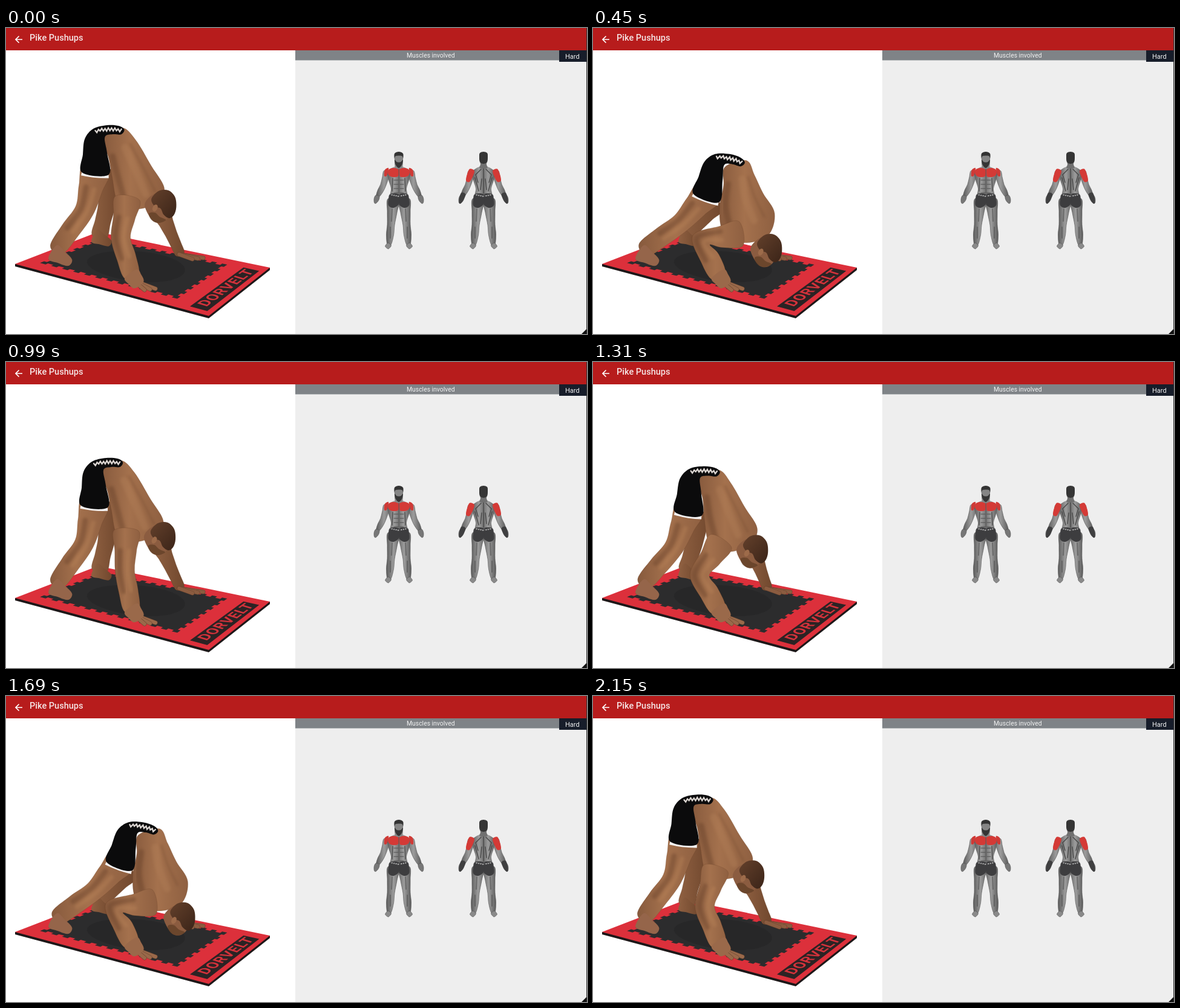
An HTML page that plays this animation: 960x507 px, repeating every 2240 ms.

```html
<!DOCTYPE html>
<html lang="en">
<head>
<meta charset="utf-8">
<title>Pike Pushups</title>
<style>
  html, body { margin: 0; width: 100%; height: 100%; overflow: hidden; background: #fff; }
  svg { display: block; width: 960px; height: 507px; }
  text { font-family: Roboto, Arial, sans-serif; }
</style>
</head>
<body>
<svg viewBox="0 0 960 507">
  <defs>
    <linearGradient id="skin">
      <stop offset="0" stop-color="#875a3d"/>
      <stop offset=".45" stop-color="#a4714d"/>
      <stop offset="1" stop-color="#8f6041"/>
    </linearGradient>
    <linearGradient id="shade">
      <stop offset="0" stop-color="#8f6041"/>
      <stop offset="1" stop-color="#71482e"/>
    </linearGradient>
    <linearGradient id="hair" x2="1" y2="1">
      <stop offset="0" stop-color="#63402b"/>
      <stop offset="1" stop-color="#3b2418"/>
    </linearGradient>
    <linearGradient id="grey">
      <stop offset="0" stop-color="#6a6a6a"/>
      <stop offset=".45" stop-color="#9c9c9c"/>
      <stop offset="1" stop-color="#5c5c5c"/>
    </linearGradient>
    <filter id="soft" x="-50%" y="-50%" width="200%" height="200%"><feGaussianBlur stdDeviation="2"/></filter>
  </defs>

  <rect x="478" y="37" width="481" height="470" fill="#eee"/>
  <rect x="478" y="37" width="437" height="16.5" fill="#7f8387"/>
  <rect width="960" height="37" fill="#b71c1c"/>
  <rect x="959" width="1" height="507" fill="#333"/>
  <rect x="914" y="37" width="45" height="19" fill="#171d2a"/>
  <path d="M959 499V507H951Z" fill="#111"/>
  <path d="M27 19H16.5M21.5 13.5L16 19L21.5 24.5" fill="none" stroke="#fff" stroke-width="1.7"/>
  <text x="39" y="21" font-size="14.5" font-weight="500" fill="#f6e6e6">Pike Pushups</text>
  <text x="662" y="49" font-size="10.4" fill="#f2f2f2">Muscles involved</text>
  <text x="924" y="51" font-size="11" fill="#f2f2f2">Hard</text>

  <g id="mat"></g>
  <text transform="matrix(.74 -.54 .957 .29 331 462)" font-size="24" font-weight="700"
        letter-spacing="1" fill="#d5323b">DORVELT</text>
  <g id="man"></g>
  <g id="muscles"></g>
</svg>
<script>
const LOOP = 2240;
// Length of each picture, in units of 10 ms
const HOLDS = [...'78787887887888789787888787889'].map(n => n * 10);
// Time and depth of the turning points; depth 0 is up, 1 is down
const TURNS = [[0, .04], [500, 1], [1000, 0], [1130, 0], [1640, 1], [LOOP, .04]];

const byId = id => document.getElementById(id);
const add = (parent, tag, attrs) => {
  const el = document.createElementNS('http://www.w3.org/2000/svg', tag);
  for (const k in attrs) el.setAttribute(k, attrs[k]);
  return parent.appendChild(el);
};
const points = s => s.split(' ').map(p => p.split(',').map(Number));
const mixPoint = (a, b, f) => a.map((v, i) => v + (b[i] - v) * f);
const mix = (a, b, f) => a.map((p, i) => mixPoint(p, b[i], f));
const poly = pts => 'M' + pts.map(p => p.map(v => v.toFixed(1)).join(' ')).join('L');

// Smooth curve through the points
function curve(pts, closed = true) {
  const n = pts.length;
  const at = i => closed ? pts[(i + n) % n] : pts[Math.max(0, Math.min(n - 1, i))];
  let d = poly([pts[0]]);
  for (let i = 0; i < (closed ? n : n - 1); i++) {
    const [a, b, c, e] = [at(i - 1), at(i), at(i + 1), at(i + 2)];
    const c1 = b.map((v, k) => v + (c[k] - a[k]) / 6);
    const c2 = c.map((v, k) => v - (e[k] - b[k]) / 6);
    d += 'C' + [...c1, ...c2, ...c].map(v => v.toFixed(1)).join(' ');
  }
  return d + (closed ? 'Z' : '');
}

// The two sides of a rounded tube around a chain of joints
function tube(joints, radii) {
  const spine = joints.flatMap((p, i) => i ? [mixPoint(joints[i - 1], p, .5), p] : [p]);
  const side = sign => spine.map(([x, y], i) => {
    const [a, b] = [spine[Math.max(0, i - 1)], spine[Math.min(spine.length - 1, i + 1)]];
    const r = sign * radii[i] / Math.hypot(b[0] - a[0], b[1] - a[1]);
    return [x - (b[1] - a[1]) * r, y + (b[0] - a[0]) * r];
  });
  return [side(1), side(-1)];
}
const outline = ([l, r]) => curve([...l, ...[...r].reverse()]);

const blob = (parent, pts, fill, extra) => add(parent, 'path', { d: curve(points(pts)), fill, ...extra });
const rod = (parent, joints, radii, fill, extra) =>
  add(parent, 'path', { d: outline(tube(points(joints), radii)), fill, ...extra });
const line = (parent, d, stroke, width, extra) =>
  add(parent, 'path', { d, fill: 'none', stroke, 'stroke-width': width, 'stroke-linecap': 'round', ...extra });

// Mat: u runs along the long side, v from the back to the front
const matPoint = (u, v) => mixPoint(
  mixPoint([152, 338], [436, 397], u), mixPoint([15, 391], [335, 477], u), v);

function teeth(from, to, count, [du, dv]) {
  return Array.from({ length: count * 2 }, (_, k) => {
    const i = k >> 1;
    const [u, v] = mixPoint(from, to, (i + k % 2) / count);
    return i % 2 ? matPoint(u + du, v + dv) : matPoint(u, v);
  });
}

function drawMat() {
  const g = byId('mat');
  const shape = (pts, fill) => add(g, 'path', { d: poly(pts) + 'Z', fill });
  const quad = (u0, v0, u1, v1) =>
    [matPoint(u0, v0), matPoint(u1, v0), matPoint(u1, v1), matPoint(u0, v1)];
  const base = quad(0, 0, 1, 1);
  shape([...base.slice(1, 2), ...[base[1], base[2], base[3]].map(([x, y]) => [x, y + 4]), base[3]], '#1d1718');
  shape(base, '#dc303b');
  const [a, b, c, d] = quadCorners(.07, .1, .79, .86);
  shape([
    ...teeth(a, b, 25, [0, .03]), ...teeth(b, c, 15, [-.015, 0]),
    ...teeth(c, d, 25, [0, -.03]), ...teeth(d, a, 15, [.015, 0])
  ], '#2c2c2d');
  const disc = Array.from({ length: 36 }, (_, i) => {
    const t = i * Math.PI / 18;
    return matPoint(.43 + .24 * Math.cos(t), .48 + .3 * Math.sin(t));
  });
  shape(disc, '#272728');
  shape(quad(.88, .09, .97, .93), '#2b2324');
}
const quadCorners = (u0, v0, u1, v1) => [[u0, v0], [u1, v0], [u1, v1], [u0, v1]];

const man = byId('man');
const movers = [];

// A part whose two sides follow the depth; ridges: [place between sides, colour, width]
function part(sidesAt, fill, ridges = []) {
  const body = add(man, 'path', { fill, stroke: '#5d381f', 'stroke-width': .7, 'stroke-opacity': .3 });
  const lines = ridges.map(([f, color, width]) =>
    [f, line(man, '', color, width, { opacity: .38, filter: 'url(#soft)' })]);
  movers.push(depth => {
    const [l, r] = sidesAt(depth);
    body.setAttribute('d', outline([l, r]));
    for (const [f, el] of lines) el.setAttribute('d', curve(mix(l, r, f).slice(1, -1), false));
  });
}

// Limb between the joints of the up pose and the down pose
function limb(up, down, radii, fill, ridges) {
  const [a, b] = [points(up), points(down)];
  part(depth => tube(mix(a, b, depth), radii), fill, ridges);
}

// Middle joint of a two-bone limb
function bend(a, c, ab, bc) {
  const [dx, dy] = [c[0] - a[0], c[1] - a[1]];
  const dist = Math.hypot(dx, dy);
  const along = (ab * ab - bc * bc + dist * dist) / (2 * dist);
  const out = Math.sqrt(Math.max(0, ab * ab - along * along));
  return [a[0] + (dx * along - dy * out) / dist, a[1] + (dy * along + dx * out) / dist];
}

function drawNearArm() {
  const wrist = [208, 412];
  part(depth => {
    const shoulder = mixPoint([199, 279], [246, 342], depth);
    return tube([shoulder, bend(shoulder, wrist, 67, 67), wrist], [20, 18, 16, 16, 12]);
  }, 'url(#skin)', [[.25, '#633d26', 8], [.65, '#b98459', 7]]);
}

function drawTorso() {
  const [belly, back] = [
    ['158,178 168,215 174,245 184,288 212,298', '219,232 217,262 210,300 216,338 250,357'],
    ['189,163 212,183 238,226 260,264 246,288', '255,221 268,245 282,275 301,308 290,345']
  ].map(pair => pair.map(points));
  part(depth => [mix(...belly, depth), mix(...back, depth)], 'url(#skin)',
    [[.14, '#633d26', 10], [.6, '#b38058', 12], [.8, '#70472d', 3]]);
}

function drawShorts() {
  const g = add(man, 'g', {});
  line(g, 'M123 240Q146 245 168 244', '#f4f2f2', 5.5, { 'stroke-linecap': 'butt' });
  blob(g, '124,238 125,208 128,182 142,165 165,159 184,160 193,166 188,174 174,174 161,179 165,205 168,241', '#0b0b0c');
  let seed = 7;
  const random = () => (seed = seed * 16807 % 2147483647) / 2147483647;
  const print = Array.from({ length: 17 }, (_, i) => {
    const x = 145 + i * 2.7;
    return [x, 166 + (x - 170) ** 2 / 200 + (i % 2 ? 1 : -1) * (1 + 2 * random())];
  });
  line(g, poly(print), '#dcd6d2', 2.3);
  movers.push(depth => g.setAttribute('transform',
    `translate(${51 * depth} ${47 * depth}) rotate(${15 * depth} 155 203)`));
}

function drawHead() {
  const g = add(man, 'g', {});
  blob(g, '-31,2 -24,-12 -8,-20 10,-10 12,10 4,25 -8,30 -20,24', '#8b5c40');
  blob(g, '-24,14 -14,13 -6,20 4,25 -8,30 -20,25', '#56371f', { opacity: .6 });
  blob(g, '-20,-10 -8,-23 8,-24 19,-13 21,4 17,17 9,22 0,16 -5,6 -15,2', 'url(#hair)');
  add(g, 'ellipse', { cx: -14, cy: 5, rx: 4, ry: 6, fill: '#9d6b4a', transform: 'rotate(25 -14 5)' });
  movers.push(depth => g.setAttribute('transform', `translate(${259 + 33 * depth} ${290 + 78 * depth})`));
}

function drawFingers(from, tip, step, count, color) {
  for (let i = 0; i < count; i++) {
    const end = tip.map((v, k) => v + step[k] * i);
    line(man, poly([from, end]), '#6b4630', 7);
    line(man, poly([from, end]), color, 5.8);
  }
}

function drawMan() {
  const shade = 'url(#shade)', skin = 'url(#skin)';
  limb('168,235 166,294 154,346', '205,290 168,327 154,346', [16, 15, 14, 13, 12], shade);
  rod(man, '146,344 172,357', [11, 9, 5], shade);
  limb('256,305 272,340 288,375', '294,352 292,364 290,377', [13, 12, 10, 9, 7], shade);
  drawFingers([286, 375], [326, 381], [-9, 1], 3, '#8b5c40');
  limb('148,228 129,301 83,368', '195,270 146,323 83,368', [22, 20, 16, 16, 12], skin,
    [[.3, '#633d26', 9], [.65, '#b98459', 7]]);
  rod(man, '77,371 106,389', [13, 11, 6], '#95654a');
  drawTorso();
  drawShorts();
  drawHead();
  drawNearArm();
  drawFingers([210, 418], [247, 432], [-9, 1], 3, '#9a694a');
  rod(man, '206,407 220,426', [12, 13, 9], '#9a694a');
}

function drawMuscles() {
  const root = byId('muscles');
  const ink = { stroke: '#4c4c4c', 'stroke-width': .6 };

  function figure(cx, half, middle) {
    for (const side of [1, -1]) {
      const g = add(root, 'g', { transform: `translate(${cx} 0) scale(${side} 1)` });
      rod(g, '19,238 26,261 35,279', [5.5, 5, 4.5, 4.5, 2.5], 'url(#grey)', ink);
      rod(g, '35,278 39,290', [3, 4, 1.5], '#777', ink);
      rod(g, '9,284 13,326 16,359', [9, 8, 6, 6, 3], 'url(#grey)', ink);
      rod(g, '15,358 20,364', [3, 4, 3], '#8a8a8a', ink);
      blob(g, '-.5,228 5,229 13,233 19,239 17,252 13,266 14,281 -.5,284', 'url(#grey)');
      line(g, 'M11 300L12 320M14 330L14 348', '#404040', 2, { opacity: .45 });
      blob(g, '-.5,276 14,275 17,284 17,294 9,298 -.5,291', '#3d3d3f');
      line(g, 'M0 279L14 276', '#b8b8b8', 2, { 'stroke-dasharray': '2 1.5', 'stroke-linecap': 'butt' });
      half(g);
    }
    middle(add(root, 'g', { transform: `translate(${cx} 0)` }));
  }

  figure(649, g => {
    blob(g, '.5,234 10,232 17,235 17,243 10,247 .5,245', '#d43a36');
    blob(g, '17,232 23,235 24,245 20,245 18,239', '#cf3a36');
    for (let y = 252; y < 274; y += 7) line(g, `M1 ${y}H8`, '#4e4e4e', 1);
    line(g, 'M10 249L11 270', '#4e4e4e', 1.4);
  }, g => {
    line(g, 'M0 234V274', '#555', .8);
    rod(g, '0,208 0,232', [5, 7, 5], '#858585');
    blob(g, '-7,217 -7,208 0,205 7,208 7,217 5,212 -5,212', '#333');
    blob(g, '-7,218 -3,222 3,222 7,218 5,227 0,232 -5,227', '#353535');
  });

  figure(789, g => {
    rod(g, '19,235 26,254', [4, 5, 3], '#d43a36');
    rod(g, '33,274 39,290', [3.5, 4, 1.5], '#3f3f40');
    line(g, 'M4 234L13 243L9 256M14 248L8 270M3 250L5 268', '#444', 1.3);
  }, g => {
    line(g, 'M0 230V274', '#444', 1.2);
    rod(g, '0,220 0,232', [5, 5, 6], '#707070');
    blob(g, '-7,213 -6,207 0,205 6,207 7,213 6,222 0,225 -6,222', '#353535');
  });
}

function depthAt(t) {
  const i = TURNS.findIndex(([end]) => t < end);
  const [[t0, d0], [t1, d1]] = [TURNS[i - 1], TURNS[i]];
  const ease = (1 - Math.cos(Math.PI * (t - t0) / (t1 - t0))) / 2;
  return d0 + (d1 - d0) * ease;
}

function stepStart(t) {
  let start = 0;
  for (const hold of HOLDS) {
    if (t < start + hold) break;
    start += hold;
  }
  return start;
}

drawMat();
drawMan();
drawMuscles();

const origin = performance.now();
let shown = -1;
function tick() {
  const start = stepStart((performance.now() - origin) % LOOP);
  if (start !== shown) {
    shown = start;
    const depth = depthAt(start);
    for (const move of movers) move(depth);
  }
  requestAnimationFrame(tick);
}
tick();
</script>
</body>
</html>
```
